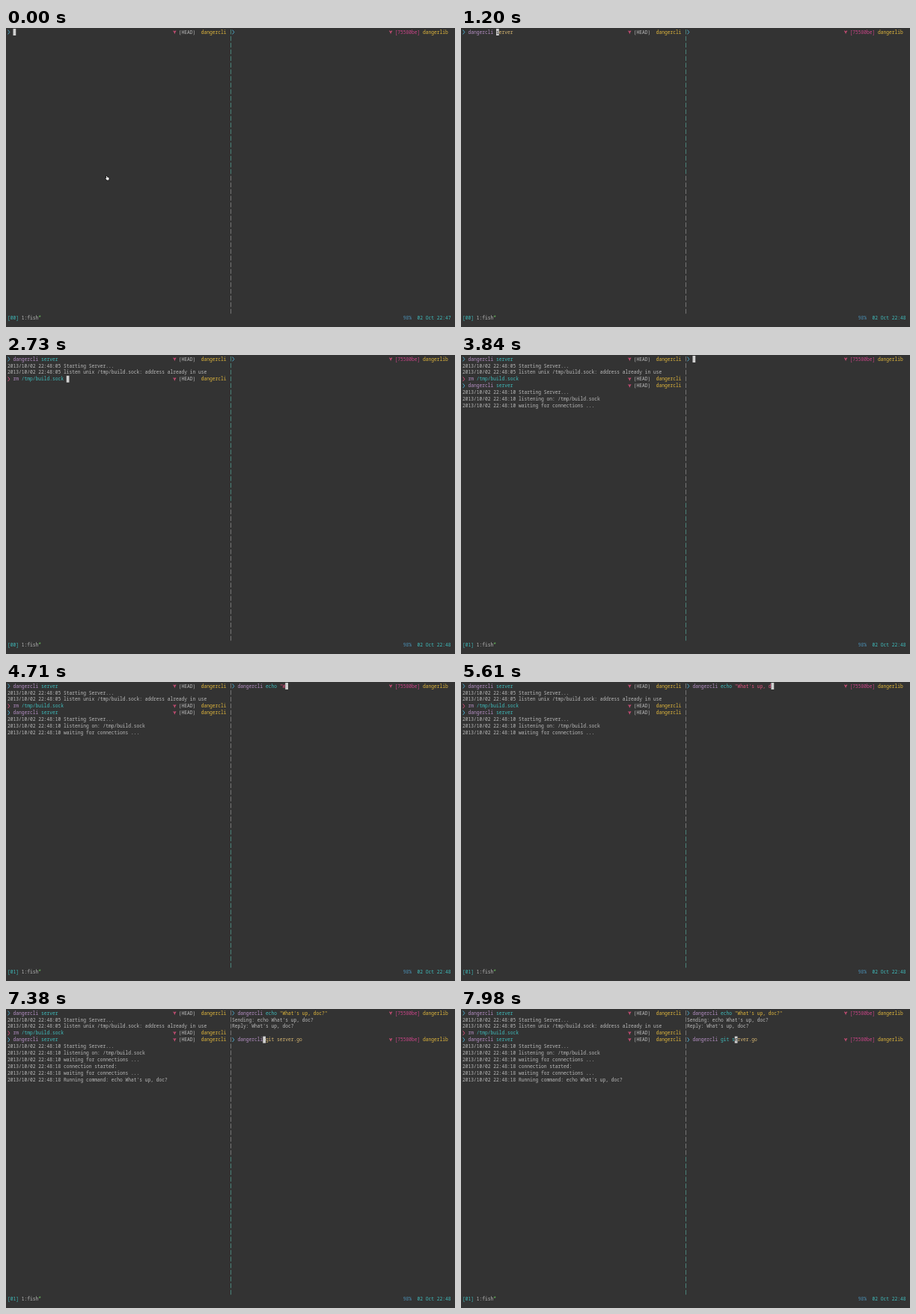
An HTML page with a canvas that plays this animation: 600x400 px, repeating every 8000 ms.

```html
<!DOCTYPE html>
<html lang="en">
<head>
<meta charset="utf-8">
<title>Terminal session</title>
<style>
  html, body { margin: 0; width: 100%; height: 100%; overflow: hidden; background: #333; }
  canvas { display: block; width: 600px; height: 400px; }
</style>
</head>
<body>
<canvas id="stage"></canvas>
<script>
const LOOP = 8000, CELL_W = 3.75, CELL_H = 8.9, LEFT = 2, TOP = 1;
const RIGHT_PANE = 80, DIVIDER_ROWS = 43, STATUS_ROW = 43;
const SWITCH_PANE = 3700, CLOCK_TICK = 500, HIDE_POINTER = 150;
const color = {
  back: '#333333', text: '#bababa', cyan: '#3fbcbc', prompt: '#4fb4d8', purple: '#b58fc4',
  pink: '#e0527f', hash: '#cc4488', gold: '#e0b63c', hint: '#d9b872', green: '#69c55c',
  blue: '#4a8fb4', divider: '#757575', activeDivider: '#4a8278', cursor: '#d0d0d0'
};

// keys: [time, characters typed], interpolated linearly.
const echo = 'dangercli echo "What\'s up, doc?"';
const commands = [
  { col: 0, row: 0, shown: 0, enter: 1620, after: 1, text: 'dangercli server',
    keys: [[100, 0], [1180, 10], [1380, 10], [1400, 16]], hints: ['dangercli server'] },
  { col: 0, row: 3, shown: 1690, enter: 2880, after: 4, failed: true, text: 'rm /tmp/build.sock ',
    keys: [[1980, 0], [2640, 12], [2680, 19]], hints: [] },
  { col: 0, row: 4, shown: 2910, enter: 3350, after: 8, text: 'dangercli server',
    keys: [[3080, 0], [3110, 16]], hints: [] },
  { col: RIGHT_PANE, row: 0, shown: 0, enter: 6040, after: 1, text: echo,
    keys: [[3880, 0], [4690, 17], [5900, 32]], hints: [] },
  { col: RIGHT_PANE, row: 4, shown: 6150, enter: LOOP, after: 5, text: 'dangercli git s',
    keys: [[6660, 0], [7420, 10], [7960, 15]], hints: [echo, 'dangercli git server.go'] }
];

const log = (time, row, second, text) =>
  ({ time, col: 0, row, text: `2013/10/02 22:48:${second} ${text}` });
const output = [
  log(1650, 1, '05', 'Starting Server...'),
  log(1670, 2, '05', 'listen unix /tmp/build.sock: address already in use'),
  log(3370, 5, '10', 'Starting Server...'),
  log(3370, 6, '10', 'listening on: /tmp/build.sock'),
  log(3370, 7, '10', 'waiting for connections ...'),
  log(6070, 8, '18', 'connection started:'),
  log(6070, 9, '18', 'waiting for connections ...'),
  log(6090, 10, '18', "Running command: echo What's up, doc?"),
  { time: 6070, col: RIGHT_PANE, row: 1, text: "Sending: echo What's up, doc?" },
  { time: 6110, col: RIGHT_PANE, row: 2, text: "Reply: What's up, doc?" }
];

const canvas = document.getElementById('stage');
const ratio = window.devicePixelRatio || 1;
canvas.width = 600 * ratio;
canvas.height = 400 * ratio;
const ctx = canvas.getContext('2d');
ctx.scale(ratio, ratio);
ctx.font = '6.25px "Noto Sans Mono", "DejaVu Sans Mono", monospace';

const cellX = col => LEFT + col * CELL_W;
const cellY = row => TOP + row * CELL_H;

function write(col, row, text, fill) {
  ctx.fillStyle = fill;
  [...text].forEach((char, i) => ctx.fillText(char, cellX(col + i), cellY(row) + 6.6));
}

function strokeInCell(col, row, path, stroke) {
  ctx.save();
  ctx.translate(cellX(col), cellY(row));
  ctx.strokeStyle = stroke;
  ctx.lineWidth = 0.9;
  ctx.stroke(new Path2D(path));
  ctx.restore();
}

const drawPrompt = (col, row, stroke) => strokeInCell(col, row, 'M.6 1.6L2.8 4.5.6 7.4', stroke);
const drawBranch = (col, row) =>
  strokeInCell(col, row, 'M.6 2.6Q.6 4.6 2.1 4.8 3.6 4.6 3.6 2.6M2.1 2.8V6.6', color.pink);

function typedCount(keys, t) {
  if (t <= keys[0][0]) return 0;
  for (let i = 1; i < keys.length; i++) {
    const [t0, n0] = keys[i - 1], [t1, n1] = keys[i];
    if (t < t1) return Math.floor(n0 + (n1 - n0) * (t - t0) / (t1 - t0));
  }
  return keys[keys.length - 1][1];
}

function tokenColor(token, index) {
  if (index === 0) return color.purple;
  if (token[0] !== '"') return color.cyan;
  return /^".*"$/.test(token) ? color.gold : color.pink;
}

function drawCommand(command, t) {
  const { col, row, text, keys, hints } = command;
  const typed = text.slice(0, typedCount(keys, t));
  drawPrompt(col, row, command.failed ? color.pink : color.prompt);

  let index = 0;
  for (const match of typed.matchAll(/"[^"]*"?|[^\s"]+/g)) {
    write(col + 2 + match.index, row, match[0], tokenColor(match[0], index++));
  }
  const hint = typed && t < command.enter &&
    hints.filter(h => h.startsWith(typed)).pop();
  if (hint) write(col + 2 + typed.length, row, hint.slice(typed.length), color.hint);

  if (col === 0) {
    drawBranch(59, row);
    write(61, row, '(HEAD)', color.text);
    write(69, row, 'dangercli', color.gold);
  } else {
    drawBranch(136, row);
    write(138, row, '[75580be]', color.hash);
    write(148, row, 'dangerlib', color.gold);
  }
  return { typed, under: hint ? hint[typed.length] : '' };
}

function drawCursor(col, row, char) {
  ctx.fillStyle = color.cursor;
  ctx.fillRect(cellX(col), cellY(row), CELL_W, 9);
  if (char) write(col, row, char, color.back);
}

// The half of the divider that belongs to the active pane is tinted: top for left, bottom for right.
function drawDivider(leftActive) {
  for (let row = 0; row < DIVIDER_ROWS; row++) {
    const topHalf = row < DIVIDER_ROWS / 2;
    ctx.fillStyle = topHalf === leftActive ? color.activeDivider : color.divider;
    ctx.fillRect(300, cellY(row) + 1, 1, 6.4);
  }
}

function drawStatus(t) {
  write(0, STATUS_ROW, t < SWITCH_PANE ? '[00]' : '[01]', color.cyan);
  write(5, STATUS_ROW, '1:fish', color.text);
  write(11, STATUS_ROW, '*', color.green);
  write(141, STATUS_ROW, '98%', color.blue);
  write(146, STATUS_ROW, t < CLOCK_TICK ? '02 Oct 22:47' : '02 Oct 22:48', color.cyan);
}

function drawPointer() {
  const hand = new Path2D('M134 198.2q.7-.5 1 .3l.4 1.3 1.5.3q.9.2.8 1.2l-.4 2.3h-2.5l-1.8-2.4q.1-.7 1.2-.3z');
  ctx.strokeStyle = '#111';
  ctx.lineWidth = 1.4;
  ctx.stroke(hand);
  ctx.fillStyle = '#eee';
  ctx.fill(hand);
}

function draw(t) {
  const leftActive = t < SWITCH_PANE;
  const activePane = leftActive ? 0 : RIGHT_PANE;
  ctx.fillStyle = color.back;
  ctx.fillRect(0, 0, 600, 400);
  drawDivider(leftActive);
  drawStatus(t);
  for (const line of output) {
    if (t >= line.time) write(line.col, line.row, line.text, color.text);
  }

  let cursor;
  for (const command of commands) {
    if (t < command.shown) continue;
    const { typed, under } = drawCommand(command, t);
    if (command.col !== activePane) continue;
    cursor = t < command.enter
      ? [command.col + 2 + typed.length, command.row, under]
      : [command.col, command.after, ''];
  }
  drawCursor(...cursor);
  if (t < HIDE_POINTER) drawPointer();
}

const start = performance.now();
function frame() {
  draw((performance.now() - start) % LOOP);
  requestAnimationFrame(frame);
}
frame();
</script>
</body>
</html>
```
